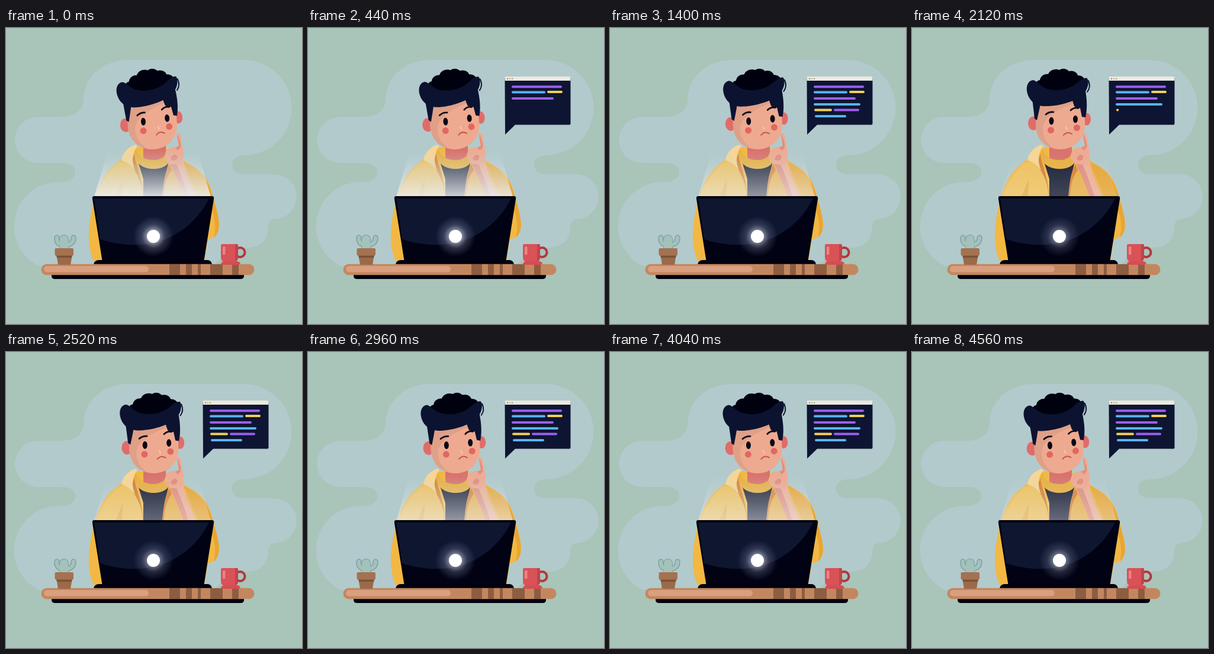
These frames come from a looping animation (500 by 500 pixels, 4800 ms). An HTML page:

```html
<!DOCTYPE html>
<html lang="en">
<head>
<meta charset="utf-8">
<title>Thinking at the laptop</title>
<style>
html, body { margin: 0; width: 100%; height: 100%; overflow: hidden; background: #a9c4b8; }
svg { display: block; width: 100vw; height: 100vh; }
</style>
</head>
<body>
<svg viewBox="0 0 500 500">
  <defs>
    <linearGradient id="beam" x1="0" y1="0" x2="0" y2="1">
      <stop offset="0" stop-color="#bfd2d6" stop-opacity="0"/>
      <stop offset=".4" stop-color="#d5e0e3" stop-opacity=".42"/>
      <stop offset="1" stop-color="#eceff3" stop-opacity=".9"/>
    </linearGradient>
    <radialGradient id="halo">
      <stop offset=".3" stop-color="#cdd1e0" stop-opacity=".7"/>
      <stop offset=".6" stop-color="#8d93af" stop-opacity=".3"/>
      <stop offset="1" stop-color="#8d93af" stop-opacity="0"/>
    </radialGradient>
    <clipPath id="faceClip"><path d="M209 125V165C210 190 228 205 251 205C276 204 291 187 292 165V120Z"/></clipPath>
  </defs>

  <rect width="500" height="500" fill="#a9c4b8"/>
  <path fill="#b2cacc" d="M206 54H402A80.500 80.500 0 0 1 402 215C389 215 382 222 382 231C382 241 390 247 404 247H453A38 38 0 0 1 453 323C446 324 443 329 443 338C442 358 430 371 405 371H385L350 402H55A75 75 0 0 1 92 260C109 260 117 252 117 244C117 234 109 228 94 228H54A39 39 0 0 1 54 150H92C116 150 131 140 131 118C133 82 164 54 206 54Z"/>

  <g id="body">
    <path fill="#f2b843" d="M214 202C200 216 195 222 186 229C168 241 157 262 149 290C142 318 139 340 140 360C142 380 146 391 150 394H335L341 357C351 355 359 347 360 334C360 320 355 302 348 278C342 255 330 240 312 231L270 203Z"/>
    <path fill="#e9a532" d="M300 226C320 234 336 246 345 272C355 302 362 325 359 340C358 346 355 351 351 354C358 330 348 305 340 285H322Z"/>
    <path fill="#f1c25c" d="M190 228C177 239 163 257 152 285H232L231 252L214 222Z"/>
    <path fill="#e8ae45" d="M197 256L185 285H196Z"/>
    <path fill="#ebb048" d="M274 232L264 285H325L304 236Z"/>
    <path fill="#171c33" d="M219 213C228 236 260 241 275 225L268 255L264 286H232V255Z"/>
    <path fill="#d9726b" d="M232 198H270V219C260 229 242 229 232 219Z"/>
    <path fill="#e9b040" d="M219 200C222 216 233 223 250 223C263 223 272 215 275 203L279 220C274 234 260 239 247 238C229 237 219 228 217 214Z"/>
    <path fill="#d98032" d="M222 198L217 212C217 226 229 244 232 285H231C230 260 221 247 211 229Z"/>
    <path fill="#d98032" d="M276 230C268 244 266 262 264 285H267C268 264 271 252 280 240Z"/>
    <path fill="#f7d694" d="M219 197C206 201 196 212 195 224C203 225 211 231 218 240C212 226 212 212 222 200Z"/>
    <path fill="#efaf96" d="M277 229C285 247 294 266 300 285H321C313 266 303 247 299 224Z"/>
    <path fill="#e28d7e" d="M277 229C285 247 294 266 300 285H308C302 264 295 247 288 230Z"/>
  </g>

  <g id="head">
    <ellipse cx="205" cy="161" rx="9" ry="11.5" fill="#e06c69"/>
    <ellipse cx="295" cy="154" rx="7" ry="10.5" fill="#e06c69"/>
    <path fill="#eeaa90" d="M209 125V165C210 190 228 205 251 205C276 204 291 187 292 165V120Z"/>
    <path clip-path="url(#faceClip)" fill="#d39a82" opacity=".55" d="M205 110H290V124C268 128 244 138 230 151C214 166 219 191 244 207H205Z"/>
    <path fill="#0c1330" d="M203 118L207 153L211 156C213 147 215 139 217 128ZM270 119L274 132L280 137L284 135L287 150L293 151C296 138 296 124 293 106Z"/>
    <path fill="#00010f" d="M208 100C208 92 212 88 216 88C217 81 224 77 230 78C233 70 243 68 249 71C254 67 262 69 265 73C272 71 279 75 280 80C287 80 292 84 292 90L288 104C270 116 220 116 208 100Z"/>
    <path fill="#0c1330" d="M204 88C210 88 215 97 226 102C244 108 264 104 276 95C284 89 290 83 296 85C300 92 297 106 286 115C270 127 240 133 222 132C206 131 196 120 194 106C193 96 197 89 204 88Z"/>
    <path fill="none" stroke="#0c1330" stroke-width="2" stroke-linecap="round" d="M298 89C301 96 300 103 296 108"/>
    <g fill="#070817">
      <ellipse cx="235.5" cy="157" rx="4" ry="6.5"/>
      <ellipse cx="276" cy="154" rx="4" ry="6.3"/>
    </g>
    <g fill="none" stroke="#070817" stroke-width="2.7" stroke-linecap="round">
      <path d="M226 146Q232 141 239 142"/>
      <path d="M268 139Q273 134 280 135"/>
    </g>
    <g fill="#e2675f">
      <circle cx="234.500" cy="172.500" r="5.500"/>
      <circle cx="278.500" cy="168.500" r="5.500"/>
    </g>
    <path fill="none" stroke="#f8c6a9" stroke-width="2" stroke-linecap="round" d="M260 167Q260 171 262 171"/>
    <path fill="none" stroke="#c9544c" stroke-width="2" stroke-linecap="round" d="M256 181Q262 174 270 179"/>
  </g>

  <g id="hand">
    <path fill="#efaa92" d="M288 181C289 176 294 176 295 182L299 205C301 216 299 226 296 231L280 230C270 227 265 219 269 212C271 204 280 200 288 201L292 199Z"/>
    <path fill="#e28d7e" d="M289 179C292 185 296 193 295 202L290 207L286 202L292 199ZM281 216C287 211 292 217 288 222C284 226 278 223 278 220Z"/>
  </g>

  <path id="light" fill="url(#beam)" d="M173 205H323L346 285H149Z"/>

  <g id="laptop">
    <path fill="#00010f" d="M149 284H348Q352 284 351 289L334 396H163L146 289Q145 284 149 284Z"/>
    <path fill="#010214" d="M149 288H348L332 392H165Z"/>
    <path fill="#0f1630" d="M149 288H343C326 322 296 350 254 362C222 370 186 366 159 357Z"/>
    <circle id="glow" cx="249" cy="352" r="34" fill="url(#halo)"/>
    <circle cx="249" cy="352" r="11" fill="#fff"/>
    <path fill="#00010f" d="M148 399Q149 393 156 392H341Q347 393 348 399Z"/>
  </g>

  <g id="desk">
    <path fill="#00010f" d="M77 416H402V419Q402 424 396 424H83Q77 424 77 419Z"/>
    <rect x="59.500" y="398.700" width="360" height="18.500" rx="9.200" fill="#c3875f"/>
    <rect x="64" y="402" width="177" height="10.500" rx="5.250" fill="#d99f7e"/>
    <path fill="#8d5d41" d="M276 399h18v18h-18zM304 399h10v18h-10zM324 399h5v18h-5zM345 399h21v18h-21zM382 399h11v18h-11z"/>
  </g>

  <g id="cactus" fill="none" stroke-linecap="round">
    <g stroke="#7f9fa6">
      <path stroke-width="16" d="M98 357V372"/>
      <path stroke-width="9" d="M86 354Q85 364 94 366M114 354Q115 364 102 367"/>
    </g>
    <g stroke="#a3c2ba">
      <path stroke-width="14" d="M98 357V372"/>
      <path stroke-width="6" d="M86 354Q85 364 94 366M114 354Q115 364 102 367"/>
    </g>
  </g>
  <path fill="#9b6a49" d="M85 382H112L109 400H88Z"/>
  <path fill="#7c5138" d="M85 384H112L111 388H86Z"/>
  <rect x="82.500" y="372" width="31.500" height="12.500" rx="2" fill="#a47251"/>

  <g id="mug">
    <circle cx="395.500" cy="379" r="8" fill="none" stroke="#b5353f" stroke-width="4"/>
    <path fill="#d85257" d="M363 367Q363 365 366 365H389Q392 365 392 367V387Q392 395 384 395H371Q363 395 363 387Z"/>
    <path fill="#bf444c" d="M387 365H389Q392 365 392 367V387Q392 393 387 394Z"/>
    <rect x="366" y="369" width="4.500" height="14" rx="1.500" fill="#e98483"/>
    <path fill="#d64d53" d="M367 394H392L396 397Q395 400 391 400H368Q364 400 363 397Z"/>
  </g>

  <g id="bubble">
    <path fill="#0e1533" d="M332.500 85H443.500V161.500Q443.500 163.500 441.500 163.500H350L333 180Z"/>
    <path fill="#ece9dd" d="M332.500 89V84Q332.500 82 334.500 82H441.500Q443.500 82 443.500 84V89Z"/>
    <circle cx="337" cy="85.700" r="1.200" fill="#d9705f"/>
    <circle cx="341" cy="85.700" r="1.200" fill="#d9b04a"/>
    <circle cx="345" cy="85.700" r="1.200" fill="#8fae8c"/>
    <g id="code" fill="none" stroke-width="4" stroke-linecap="round"></g>
  </g>
</svg>

<script>
const LOOP = 4800, LAST = 4560, TYPE_LOOP = 1600;
const TYPE_START = 125, TYPE_STEP = 79;
const TAIL = { x: 333, y: 180 };
const get = id => document.getElementById(id);
const clamp = v => Math.max(0, Math.min(1, v));

// time, head sway (0 left, 8 upright), screen light
const poses = [
  [0, 0, 1], [920, 3, .82], [1400, 5, .66], [2120, 8, .22],
  [2960, 4.3, .66], [3560, 6.2, .75], [4560, 2.2, .42]
];

// x start, x end, y, colour
const purple = '#9c5ff0', blue = '#58b4ee', yellow = '#f3d052';
const lines = [
  [346, 427, 99.2, purple], [346, 399, 108.5, blue], [406, 428, 108, yellow],
  [346, 413, 119, purple], [346, 421, 129, blue],
  [347, 373, 138.5, yellow], [380, 419, 138.5, purple], [348, 397, 149, blue]
].map(([from, to, y, color]) => {
  const el = document.createElementNS('http://www.w3.org/2000/svg', 'path');
  el.setAttribute('stroke', color);
  get('code').append(el);
  return { el, from, to, y };
});

function slope(i, k) {
  const a = poses[i - 1], b = poses[i], c = poses[i + 1];
  if (!a || !c) return 0;
  const s1 = (b[k] - a[k]) / (b[0] - a[0]), s2 = (c[k] - b[k]) / (c[0] - b[0]);
  return s1 * s2 <= 0 ? 0 : 2 * s1 * s2 / (s1 + s2);
}

// Smooth curve that turns only at the poses
function track(t, k) {
  let i = 0;
  while (i < poses.length - 2 && t > poses[i + 1][0]) i++;
  const a = poses[i], b = poses[i + 1], d = b[0] - a[0], u = (t - a[0]) / d;
  const m = u * u * (3 - 2 * u);
  return a[k] + (b[k] - a[k]) * m
    + d * u * (1 - u) * ((1 - u) * slope(i, k) - u * slope(i + 1, k));
}

function popScale(t) {
  const u = clamp((t - 40) / 400);
  if (u < .65) return 1.03 * Math.sin(u / .65 * Math.PI / 2);
  return 1 + .03 * (1 + Math.cos((u - .65) / .35 * Math.PI)) / 2;
}

function draw(time) {
  const t = Math.min(time % LOOP, LAST);
  const angle = (track(t, 1) - 8) / 2;
  const light = track(t, 2);
  get('head').setAttribute('transform', `rotate(${angle} 250 208)`);
  get('light').setAttribute('opacity', light);
  get('glow').setAttribute('opacity', .6 + .4 * light);

  const s = popScale(t);
  get('bubble').setAttribute('visibility', s > 0 ? 'visible' : 'hidden');
  get('bubble').setAttribute('transform',
    `translate(${TAIL.x * (1 - s)} ${TAIL.y * (1 - s)}) scale(${s})`);

  const p = t % TYPE_LOOP;
  lines.forEach(({ el, from, to, y }, i) => {
    const u = clamp((p - TYPE_START) / TYPE_STEP - i);
    el.setAttribute('d', u > 0 ? `M${from} ${y}H${from + (to - from) * u}` : '');
  });
}

const start = performance.now();
function tick(now) {
  draw(Math.max(0, now - start));
  requestAnimationFrame(tick);
}
draw(0);
requestAnimationFrame(tick);
</script>
</body>
</html>
```
